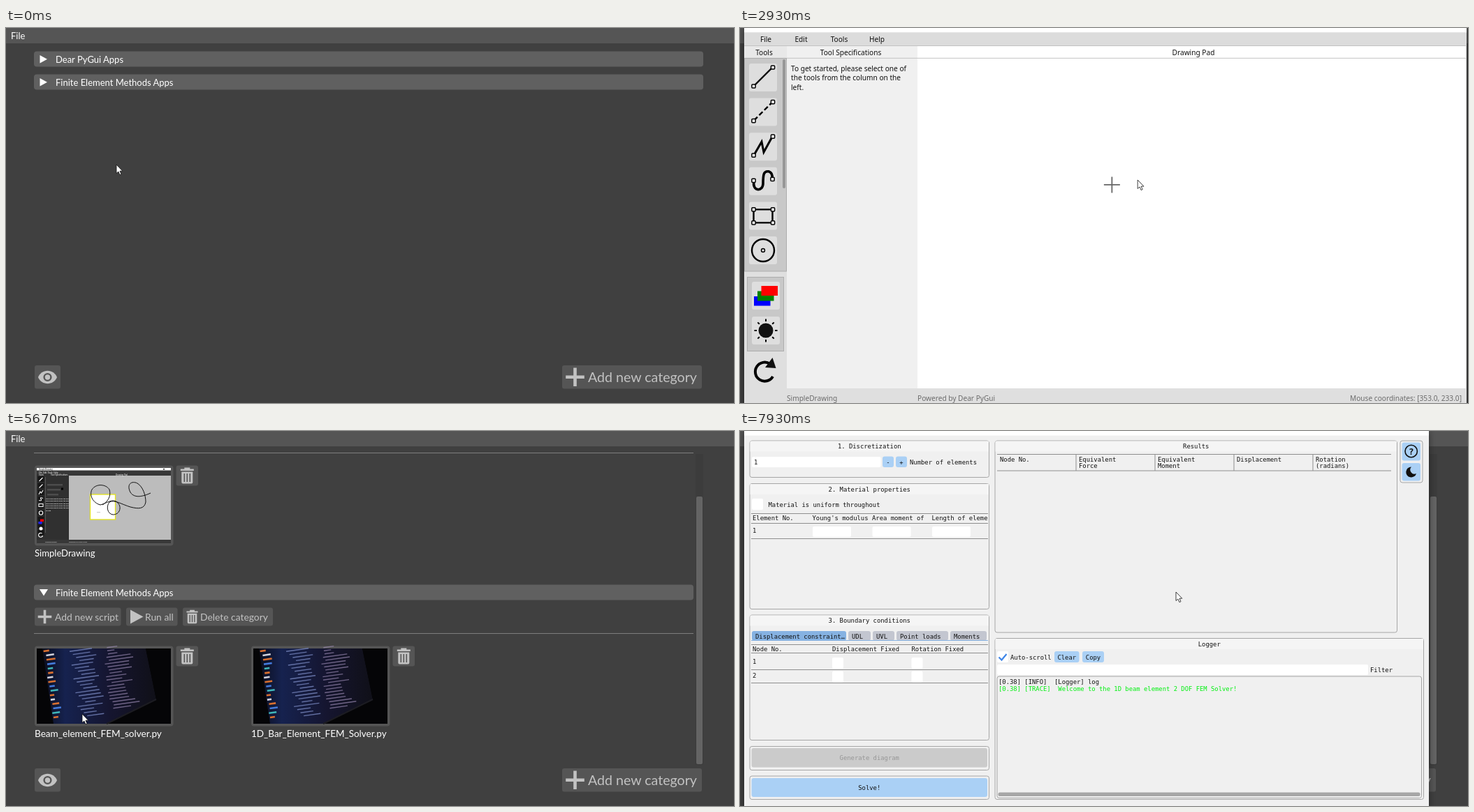
An HTML page for the animation above (8000 ms loop, 1042 px wide and 538 px high).

```html
<!DOCTYPE html>
<html lang="en">
<head>
<meta charset="utf-8">
<title>Script launcher</title>
<style>
html, body { margin: 0; width: 100%; height: 100%; overflow: hidden; background: #404040; }
svg { position: fixed; inset: 0; width: 100%; height: 100%; display: block; }
text { white-space: pre; }
.ui { font-family: Lato, sans-serif; font-size: 13px; fill: #fff; }
.draw { font-family: "Noto Sans", sans-serif; font-size: 10.15px; fill: #111; }
.title { font-family: "Open Sans", sans-serif; font-size: 8.8px; }
.fem { font-family: "DejaVu Sans Mono", monospace; font-size: 8.87px; fill: #111; }
</style>
</head>
<body>
<svg id="stage" viewBox="0 0 1042 538" preserveAspectRatio="none"></svg>
<script>
const LOOP = 8000, STEP = 1000 / 15;
const BTN = '#555', HOVER = '#757575', PRESS = '#858585', ICON = '#c2c2c2', BLUE = '#aad0f5';

// ---- drawing helpers ----
const rect = (x, y, w, h, fill, extra = '') =>
  `<rect x="${x}" y="${y}" width="${w}" height="${h}" fill="${fill}" ${extra}/>`;
const text = (x, y, s, extra = '') => `<text x="${x}" y="${y}" ${extra}>${s}</text>`;
const mid = (x, y, s, extra = '') => text(x, y, s, 'text-anchor="middle" ' + extra);
const path = (d, extra = '') => `<path d="${d}" ${extra}/>`;
const line = (d, color, w = 1, extra = '') =>
  path(d, `fill="none" stroke="${color}" stroke-width="${w}" ${extra}`);
const group = (id, body, extra = '') => `<g id="${id}" ${extra}>${body}</g>`;
const at = (x, y, body, k = 1) => `<g transform="translate(${x} ${y}) scale(${k})">${body}</g>`;
const times = (n, f) => Array.from({ length: n }, (_, i) => f(i)).join('');
const plus = (x, y, r, w) => line(`M${x - r} ${y}h${2 * r}M${x} ${y - r}v${2 * r}`, ICON, w);
const shadow = (x, y, w, h) => rect(x, y, w, h, '#000', 'opacity=".45" filter="url(#blur)"');

function seeded(seed) {
  return () => (seed = (seed * 16807) % 2147483647) / 2147483647;
}

// ---- launcher ----
const trash = (x, y, k) => at(x, y,
  path('M-9.5 -9.5H-4V-11.5H4V-9.5H9.5V-7H-9.5ZM-8 -5.5H8V9.5Q8 11.5 6 11.5H-6Q-8 11.5 -8 9.5Z', `fill="${ICON}"`) +
  line('M-4 -3V9M0 -3V9M4 -3V9', BTN, 1.6), k);

const drawingThumb = () =>
  rect(0, 0, 192, 108, '#383838') + rect(0, 0, 192, 3.5, '#fff') + rect(181, 1, 2, 1.5, '#333') +
  text(3, 3.2, 'SimpleDrawing', 'font-size="3" style="fill:#222"') +
  rect(0, 9, 46, 94, '#303030') + rect(46, 11, 146, 92, '#bcbcbc') +
  text(3, 7.5, 'File  Edit  Tools  Help', 'font-size="3"') + text(3, 11, 'Tools', 'font-size="3"') +
  text(20, 11, 'Tool Specifications', 'font-size="3"') + text(113, 10.5, 'Drawing Pad', 'font-size="3"') +
  rect(12, 13, .7, 80, '#666') +
  times(9, i => rect(1.5, 12 + i * 9.6, 9, 8, '#161616')) +
  line('M3.500 19l5 -5M3.500 28.500l5 -5M3 38l2 -4l1.500 2l2.500 -4M9 43.500q-5 -2 -3 1t-3 2M3 51.500h6v4h-6z' +
    'M8.700 64.500a2.700 2.700 0 1 0 -5.400 0a2.700 2.700 0 1 0 5.400 0M8.500 97a3 3 0 1 1 -1 -3', '#fff', 1.1) +
  '<circle cx="6" cy="87" r="2.500" fill="#fff"/>' +
  rect(2.500, 77, 5, 3.5, '#22f') + rect(5, 73.5, 5, 3.5, '#e00') +
  times(3, i => rect(15, 23 + i * 7, 22 - i * 3, 2.5, '#4c4c4c')) + rect(35, 28.5, 3, 3, '#000') +
  times(6, i => text(13, 45 + i * 3.3, i < 5 ? 'Press and drag to draw the line' : 'on pad', 'font-size="2.4" font-weight="bold"')) +
  text(12, 106.8, 'SimpleDrawing', 'font-size="2.5"') + text(46, 106.8, 'Powered by Dear PyGui', 'font-size="2.5"') +
  rect(76.5, 38, 36, 36, '#fff', 'stroke="#e2e21c" stroke-width="1.3"') + rect(86, 63.5, 5, .6, '#999') +
  at(-44, -125, line('M207 161C196 166 184 169 178 160C172 148 180 143 188 147C196 152 200 164 200 174' +
    'C198 184 190 184 178 181C165 177 155 170 148 174C143 180 145 191 153 192C163 192 166 181 160 175' +
    'C153 168 146 175 135 178C124 175 119 164 123 156C129 147 143 148 148 156C151 166 145 174 138 178', '#111'));

// Tilted monitor with rows of code, dark room around it.
function codeThumb() {
  const rnd = seeded(41), tones = ['#f07a30', '#e8e8f0', '#f07a30', '#4a86f0', '#45c8c8'];
  return rect(0, 0, 192, 108, '#050507') +
    path('M8 0H156L171 73L100 108H24Z', 'fill="url(#screen)"') +
    '<g transform="rotate(-8)">' +
    times(16, i => rect(9 + rnd() * 3, 4 + i * 6.4, 5 + rnd() * 8, 2.6, tones[i % 5], 'opacity=".9"')) +
    times(20, i => rect(46 + (i % 4) * 4, 10 + i * 5, 14 + rnd() * 24, 1.4, '#7f8fc8', 'opacity=".75"') +
      rect(92 + rnd() * 8, 12 + i * 4.6, 10 + rnd() * 28, 1.4, '#a08fb8', 'opacity=".65"')) +
    '</g>' + path('M192 0H156L171 73L100 108H192Z', 'fill="#050507"') +
    line('M171 73L100 108', '#1c1c22', 2);
}

// One collapsible section; coordinates are relative to its header.
function category(id, title, cards) {
  const tool = (x, w, label, lx, icon, name) =>
    rect(x, 33, w, 26, BTN, `rx="3" id="${id}${name}"`) + icon +
    text(lx, 51, label, `style="fill:${ICON};font-size:13.85px"`);
  const body = tool(41, 123.5, 'Add new script', 70, plus(55.5, 46, 9.8, 3.6), 'add') +
    tool(172, 73.5, 'Run all', 199, path('M178 36V56L196.5 46Z', `fill="${ICON}"`), 'run') +
    tool(253, 129, 'Delete category', 278, trash(266.5, 46, .85), 'del') +
    rect(40, 69.5, 958, 1, '#7e7e7e', `id="${id}sep"`) +
    cards.map(([label, art, size], i) => at(i * 310, 0,
      rect(41, 88, 198.5, 115, BTN, `rx="4" id="${id}card${i}"`) +
      at(44, 91.5, art) + text(41, 218, label, `style="font-size:${size}px"`) +
      rect(243.5, 88, 31.5, 29, BTN, 'rx="3"') + trash(259.3, 102.5, 1))).join('');
  return group(id, rect(40, 0, 958, 22, '#606060', `rx="4" id="${id}head"`) +
    path('', `id="${id}arrow" fill="#fff"`) + text(71, 16, title) + group(id + 'body', body));
}

const launcher = () => '<g class="ui">' +
  rect(0, 0, 1042, 538, '#404040') + rect(0, 0, 1042, 22, BTN) + text(7, 16, 'File') +
  '<g clip-path="url(#list)">' + group('scroll',
    category('a', 'Dear PyGui Apps', [['SimpleDrawing', drawingThumb(), 13.1]]) +
    category('b', 'Finite Element Methods Apps', [['Beam_element_FEM_solver.py', codeThumb(), 13.6],
      ['1D_Bar_Element_FEM_Solver.py', codeThumb(), 13.5]])) + '</g>' +
  group('bar', rect(987, 33, 11, 446, '#000', 'opacity=".06"') + rect(988, 33, 9, 384, '#646464', 'rx="2" id="grab"')) +
  rect(41, 484, 37, 33.5, BTN, 'rx="3"') + rect(796, 484, 200, 33.5, BTN, 'rx="3"') +
  path('M46 501C48.100 495.600 53.400 491.800 59.500 491.800S70.900 495.600 73 501' +
    'C70.900 506.400 65.600 510.200 59.500 510.200S48.100 506.400 46 501Z', `fill="${ICON}"`) +
  `<circle cx="59.500" cy="501" r="4.900" fill="${ICON}" stroke="${BTN}" stroke-width="2.400"/>` +
  plus(814.5, 500.7, 13.3, 4.6) +
  text(833, 507.5, 'Add new category', `style="fill:${ICON};font-size:19.6px"`) + '</g>';

// ---- console windows ----
const consoleWin = (id, x, y, script) => group(id, at(x, y,
  shadow(0, 2, 745, 389) + rect(0, 0, 745, 389, '#fff') + rect(0, 23, 732, 366, '#000') +
  rect(732, 23, 13, 366, '#f0f0f0') + rect(733, 35.5, 11, 13.5, '#cdcdcd') +
  line('M736 31.500l3 -3l3 3M736 381.500l3 3l3 -3', '#444', 1.5) +
  rect(6, 6, 12, 9.5, '#000') +
  text(22, 14.5, 'C:\\WINDOWS\\system32\\cmd.exe - ' + script, `class="title" id="${id}name"`) +
  line('M654 11.500h8M689 7.500h7v7h-7zM724 7.500l7.500 7.500m0 -7.500l-7.500 7.500', '#000', 1, `id="${id}btn"`)));

// ---- drawing app ----
function drawingApp() {
  const node = (x, y) => rect(x - 2.6, y - 2.6, 5.2, 5.2, '#fff', 'stroke="#000" stroke-width="1.5" rx="1"');
  const ends = node(6.5, 32.5) + node(34, 5.5);
  const ink = (d, w = 2.4, extra = '') => line(d, '#000', w, extra);
  const icons = [
    ink('M7 32L33 6') + ends,
    ink('M7 32L33 6', 2.4, 'stroke-dasharray="7 3.500"') + ends,
    ink('M7 32L18 13L21 28L33 6', 3) + ends,
    ink('M7 20C4 34 19 36 20 24C20 10 21 5 28 6Q34 8 33 16', 3.6) + node(6.5, 19) + node(33.5, 17),
    ink('M6.500 11H33.500V30H6.500Z') + node(34, 11) + node(6.5, 30) + node(34, 30) + node(6.5, 11),
    ink('M36 20a16 16 0 1 0 -32 0a16 16 0 1 0 32 0') + ink('M22.500 20a2.500 2.500 0 1 0 -5 0a2.500 2.500 0 1 0 5 0', 1.4)
  ];
  const key = body => rect(0, 0, 40, 40, '#dedede', 'rx="3"') + body;
  const sun = '<circle cx="20" cy="20" r="10.500"/>' +
    times(8, i => `<g transform="rotate(${i * 45} 20 20)">${ink('M20 3.500v3.500', 2)}</g>`);
  const heads = [['File', 37], ['Edit', 87.5], ['Tools', 142], ['Help', 196]];
  return group('pad', '<g class="draw">' + shadow(6, 0, 1034, 560) +
    rect(6, 0, 1034, 538, '#dfdfdf') + rect(6, 0, 1034, 6.5, '#fff') + rect(6, 6.5, 1033, 18.5, '#dcdcdc') +
    heads.map(([s, x]) => mid(x, 20, s)).join('') +
    rect(67, 25, 187, 492, '#f0f0f0') + rect(254, 25, 785, 492, '#fff') + rect(6, 25, 61, 18, '#e8e8e8') +
    line('M6 25.500H1039M6 43.300H1039', '#c2c2c2') +
    mid(34.5, 39, 'Tools') + mid(158.5, 39, 'Tool Specifications') + mid(649, 39, 'Drawing Pad') +
    rect(6.5, 43.5, 60, 305.5, '#c8c8c8', 'stroke="#adadad"') + rect(61, 45, 4, 185, '#979797', 'rx="2"') +
    icons.map((d, i) => at(13, 51 + i * 49.6, key(d))).join('') +
    rect(10.5, 357.5, 52, 106, '#c8c8c8', 'stroke="#adadad"') +
    at(17, 364, key(rect(3, 21, 23.5, 13.5, '#00f') + rect(8, 13.5, 23.5, 14, '#008000') + rect(13.5, 6, 23.5, 14, '#f00'))) +
    at(17, 414, key(sun)) +
    ink('M43 482A13.500 13.500 0 1 0 47 500', 4) + path('M36 487L51.500 488L46.500 473Z') +
    ['To get started, please select one of', 'the tools from the column on the', 'left.']
      .map((s, i) => text(73, 61.5 + i * 13.7, s)).join('') +
    '<g style="fill:#6c6c6c">' + text(67, 535, 'SimpleDrawing') + text(254, 535, 'Powered by Dear PyGui') +
    text(1033, 535, '', 'id="coords" text-anchor="end"') + '</g>' +
    line('M-11.500 0h23M0 -11.500v23', '#666', 1.8, 'id="cross"') + '</g>');
}

// ---- beam solver ----
function solverApp() {
  const panel = (x, y, r, b, title) =>
    rect(x + .5, y + .5, r - x - 1, b - y - 1, '#f0f0f0', 'rx="3" stroke="#a6a6a6"') +
    (title ? rect(x + 1, y + 1, r - x - 2, 15, '#f5f5f5') + mid((x + r) / 2, y + 11.5, title) : '');
  const box = (x, y, w, h = 15) => rect(x, y, w, h, '#fff', 'rx="2"');
  const btn = (x, y, w, h, s = '', fill = BLUE, ink = '#111') => rect(x, y, w, h, fill, 'rx="3"') +
    mid(x + w / 2, y + h / 2 + 3.5, s, `style="fill:${ink}"`);
  const rule = (y, x = 16, r = 355) => line(`M${x} ${y}H${r}`, '#8e8e8e');
  const row = (y, xs, labels) => labels.map((s, i) => text(xs[i], y, s)).join('');
  const tabs = [[17, 135, 'Displacement constraint…'], [155, 32, 'UDL'], [190, 31, 'UVL'],
    [224, 74, 'Point loads'], [301, 52, 'Moments']];
  const cols = [372, 485, 598, 711, 824];
  return group('solver', '<g class="fem">' + shadow(6, 0, 980, 560) +
    rect(6, 0, 980, 538, '#f0f0f0') + rect(6, 0, 980, 6.5, '#fff') +
    panel(13.5, 13.5, 357, 67, '1. Discretization') + box(17, 37, 184.5) + text(20, 48, '1') +
    btn(204, 36.5, 16, 15.5, '-') + btn(223, 36.5, 16, 15.5, '+') + text(243, 47.5, 'Number of elements') +
    panel(13.5, 75, 357, 256, '2. Material properties') + box(17, 97, 16, 16) +
    text(40.5, 108.5, 'Material is uniform throughout') + rule(118.5) +
    row(128, [18, 103.5, 189, 274.5], ['Element No.', "Young's modulus", 'Area moment of', 'Length of eleme']) + rule(132.5) +
    text(18, 146, '1') + times(3, i => box(104 + i * 85.5, 137, 55)) + rule(154.5) +
    panel(13.5, 263.5, 357, 444, '3. Boundary conditions') +
    tabs.map(([x, w, s], i) => rect(x, 287, w, 13.5, i ? '#c3c6d0' : '#86b2e2', 'rx="3"') + text(x + 5, 297.5, s)).join('') +
    line('M16 300.500H355', '#86b2e2') + rule(306.5) +
    row(316, [18, 132, 245.5], ['Node No.', 'Displacement Fixed', 'Rotation Fixed']) + rule(318.5) +
    times(2, i => text(18, 334 + i * 19.5, i + 1) + box(132, 325 + i * 19.5, 16, 16) +
      box(245.5, 325 + i * 19.5, 16, 16) + rule(342.5 + i * 19)) +
    panel(13.5, 452, 357, 487) + btn(16.5, 455, 337.5, 27.5, 'Generate diagram', '#cbcbcb', '#969696') +
    panel(13.5, 494.5, 357, 529) + btn(16.5, 498, 337.5, 27, 'Solve!') +
    panel(364.5, 13.5, 941, 289.5, 'Results') + rule(33.5, 368, 932) + rule(57, 368, 932) +
    line(cols.slice(1).map(x => `M${x - 4} 34V57`).join(''), '#8e8e8e') +
    row(43.5, cols, ['Node No.', 'Equivalent', 'Equivalent', 'Displacement', 'Rotation']) +
    row(53, cols, ['', 'Force', 'Moment', '', '(radians)']) +
    panel(944.5, 13.5, 977.5, 74.5) + btn(947.5, 16.5, 26.5, 26) + btn(947.5, 46, 26.5, 25.5) +
    '<circle cx="960.700" cy="29" r="8.700" fill="none" stroke="#111" stroke-width="1.600"/>' +
    mid(960.7, 33.5, '?', 'style="font-size:12.500px;font-weight:bold"') +
    path('M961 51.500a7.500 7.500 0 1 0 7 9.500a6 6 0 0 1 -7 -9.500Z') +
    panel(364.5, 297, 979, 529, 'Logger') + box(368, 316, 16, 16) + line('M370.500 324.500l4 4l7 -8.500', '#3f86e8', 2.2) +
    text(387, 328, 'Auto-scroll') + btn(450, 316, 35.5, 16, 'Clear') + btn(490, 316, 31, 16, 'Copy') +
    box(368, 335, 531) + text(902, 345.5, 'Filter') + panel(367.5, 351.5, 976, 527) +
    rect(369.5, 518.5, 604, 5.5, '#a6a6a6', 'rx="2.500"') +
    text(370, 363, '[0.38] [INFO]  [Logger] log') +
    text(370, 373, '[0.38] [TRACE]  Welcome to the 1D beam element 2 DOF FEM Solver!', 'style="fill:#00f010"') + '</g>');
}

document.getElementById('stage').innerHTML =
  '<defs><clipPath id="list"><rect x="40" y="31" width="958" height="450"/></clipPath>' +
  '<filter id="blur" x="-10%" y="-10%" width="120%" height="120%"><feGaussianBlur stdDeviation="5"/></filter>' +
  '<linearGradient id="screen"><stop stop-color="#0a0d1c"/><stop offset=".2" stop-color="#16224f"/>' +
  '<stop offset=".6" stop-color="#15152f"/><stop offset="1" stop-color="#101018"/></linearGradient></defs>' +
  launcher() + consoleWin('cmd', 46, 23, 'SimpleDrawing.py') + drawingApp() +
  consoleWin('bar1', 65.5, 42.5, '1D_Bar_Element_FEM_Solver.py') +
  consoleWin('beam', 85, 62.5, 'Beam_element_FEM_solver.py') + solverApp() +
  path('M0 0V12.500L2.900 10L4.900 14.600L7 13.700L5 9.200H8.800Z',
    'id="cursor" fill="#fff" stroke="#111" stroke-width=".8"');

// ---- motion ----
const el = {};
document.querySelectorAll('svg [id]').forEach(n => el[n.id] = n);
const set = (id, name, v) => el[id].setAttribute(name, v);
const show = (id, on) => set(id, 'display', on ? 'inline' : 'none');
const within = (t, a, b) => t >= a && t < b;

// time, x, y
const route = [
  [0, 158, 196], [200, 130, 150], [465, 63, 46], [933, 63, 46], [1133, 88, 100], [1400, 128, 174],
  [1867, 128, 174], [2130, 340, 205], [2400, 525, 231], [2800, 525, 231], [2866, 532, 225], [2933, 569, 218],
  [3133, 660, 200], [3467, 660, 200], [3733, 1022, 0], [3867, 1022, 0], [4133, 400, 220], [4333, 135, 323],
  [4600, 124, 297], [4933, 108, 302], [5333, 108, 302], [5533, 110, 350], [5600, 110, 350], [5666, 109, 406],
  [5800, 109, 406], [5867, 135, 380], [6000, 248, 285], [6066, 232, 267], [6600, 232, 267], [6666, 240, 270],
  [6733, 259, 277], [7200, 590, 240], [7467, 590, 240], [7933, 624, 231]
];

function pointer(t) {
  const i = route.findIndex(k => k[0] > t);
  if (i < 0) return route[route.length - 1].slice(1);
  const [a, b] = [route[i - 1], route[i]], k = (t - a[0]) / (b[0] - a[0]);
  return [a[1] + (b[1] - a[1]) * k, a[2] + (b[2] - a[2]) * k];
}

const ease = (t, start, span) => 1 - (1 - Math.min(1, Math.max(0, (t - start) / span))) ** 3;

// Windows fade while growing slightly around their centre.
function fade(id, k, cx, cy) {
  const s = .952 + .048 * k;
  show(id, k > .005);
  set(id, 'opacity', k);
  set(id, 'transform', `translate(${cx * (1 - s)} ${cy * (1 - s)}) scale(${s})`);
}

function focus(id, active) {
  set(id + 'name', 'fill', active ? '#111' : '#8a8a8a');
  set(id + 'btn', 'stroke', active ? '#111' : '#8a8a8a');
}

function section(id, y, open, hover, width) {
  set(id, 'transform', `translate(0 ${y})`);
  set(id + 'head', 'fill', hover ? HOVER : '#606060');
  set(id + 'head', 'width', width);
  set(id + 'sep', 'width', width);
  set(id + 'arrow', 'd', open ? 'M48 6.500H60L54 16Z' : 'M48.500 5.500V17L59 11.300Z');
  show(id + 'body', open);
}

function draw(ms) {
  const t = Math.floor((ms + 5) / STEP) * STEP;
  const openA = t >= 795, openB = t >= 5060, bar = t >= 5190, down = t >= 5660;
  const width = bar ? 944 : 958;
  section('a', 33.5, openA, within(t, 795, 1060), width);
  section('b', openA ? 292.5 : 66.5, openB, within(t, 4460, 5460), width);
  set('scroll', 'transform', `translate(0 ${down ? -72 : 0})`);
  show('bar', bar);
  set('grab', 'y', down ? 94 : 33);
  set('acard0', 'fill', within(t, 1660, 1860) ? PRESS : within(t, 1260, 1660) ? '#6e6e6e' : BTN);
  set('brun', 'fill', within(t, 6460, 6525) ? PRESS : within(t, 6525, 6660) ? '#6e6e6e' : BTN);

  fade('cmd', ease(t, 1840, 325) - ease(t, 3900, 230), 418.5, 217.5);
  fade('pad', ease(t, 2690, 230) - ease(t, 3760, 230), 523, 280);
  const pair = ease(t, 6640, 325);
  fade('bar1', pair, 438, 237);
  fade('beam', pair, 457.5, 257);
  fade('solver', ease(t, 7440, 300), 496, 280);
  focus('cmd', t < 2660 || t > 3800);
  focus('bar1', t < 6770);
  focus('beam', within(t, 6770, 7390));

  const [cx, cy] = pointer(Math.max(0, t - STEP));
  set('cross', 'transform', `translate(${cx} ${cy})`);
  show('cross', cx > 254 && cy > 43);
  el.coords.textContent = 'Mouse coordinates: [' +
    [(cx - 254) / .7875, (cy - 43) / .781].map(v => Math.round(v).toFixed(1)).join(', ') + ']';
  set('cursor', 'transform', `translate(${pointer(t).join(' ')})`);
}

const begin = performance.now();
function tick() {
  draw((performance.now() - begin) % LOOP);
  requestAnimationFrame(tick);
}
tick();
</script>
</body>
</html>
```
